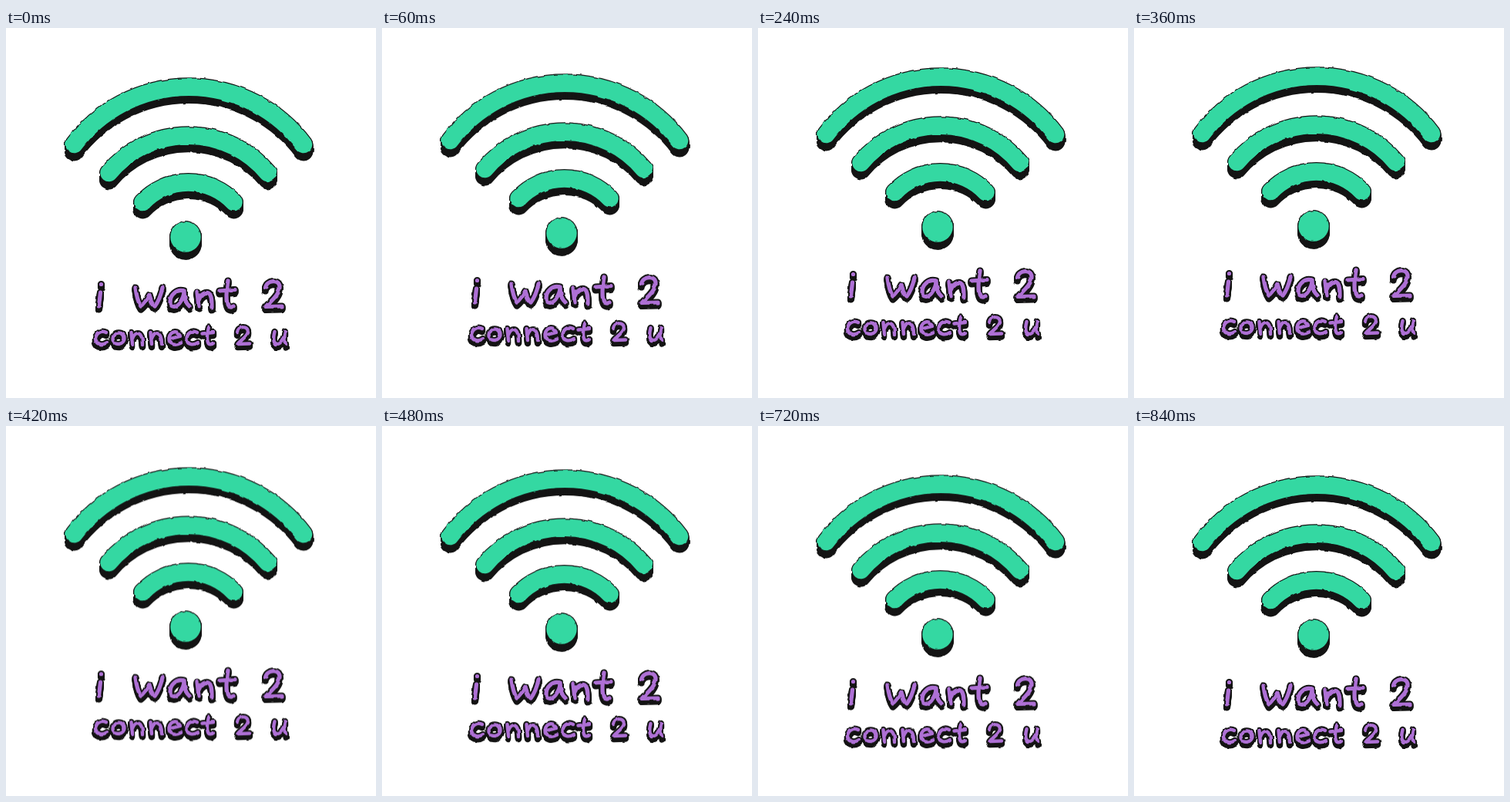
An HTML page that plays this animation: 480 by 480 pixels, repeating every 990 ms.

```html
<!DOCTYPE html>
<html lang="en">
<head>
<meta charset="utf-8">
<title>i want 2 connect 2 u</title>
<style>
  html, body { margin: 0; width: 100%; height: 100%; overflow: hidden; background: #fff; }
  svg { display: block; width: 100%; height: 100%; }
  path { fill: none; stroke-linecap: round; stroke-linejoin: round; }
</style>
</head>
<body>
<svg viewBox="0 0 480 480" role="img" aria-label="i want 2 connect 2 u">
  <filter id="rough" filterUnits="userSpaceOnUse" x="0" y="0" width="480" height="480" color-interpolation-filters="sRGB">
    <feTurbulence type="fractalNoise" baseFrequency=".11" numOctaves="1" seed="4"/>
    <feDisplacementMap in="SourceGraphic" scale="3.2" xChannelSelector="R" yChannelSelector="G"/>
  </filter>
  <g id="float"><g id="art" filter="url(#rough)"></g></g>
</svg>
<script>
const GREEN = '#34d8a2', PURPLE = '#ae70d5', INK = '#141414';
const art = document.getElementById('art');
const float = document.getElementById('float');

function stroke(d, color, width, dy = 0) {
  const p = document.createElementNS('http://www.w3.org/2000/svg', 'path');
  p.setAttribute('d', d);
  p.setAttribute('stroke', color);
  p.setAttribute('stroke-width', width);
  p.setAttribute('transform', `translate(0 ${dy})`);
  art.append(p);
}

// Coloured stroke with an ink rim, extruded downwards
function block(d, color, width, rim, depth) {
  for (let dy = depth; dy >= 0; dy--) stroke(d, INK, width + 2 * rim, dy);
  stroke(d, color, width);
}

const arc = (x1, x2, y, r) => `M${x1} ${y}A${r} ${r} 0 0 1 ${x2} ${y}`;

block(arc(88.5, 386, 151, 186), GREEN, 22.5, 1.2, 9);
block(arc(133.5, 339.5, 188, 134), GREEN, 22.5, 1.2, 9);
block(arc(177.5, 295.5, 226, 81), GREEN, 22.5, 1.2, 9);
block('M233 271h.01', GREEN, 39.5, 1.2, 9);

const line1 = [
  'M123.5 332.5h.01M122.5 343L120.5 361',
  'M168 337C169 346 171 355 175 361C180 358 183 352 186 346C187 352 189 358 193 361C198 355 201 346 203 337',
  'M231 341C221 338 213 347 213 355C213 363 220 363 225 357C229 352 231 347 231 341C231 350 233 357 238 361',
  'M248 343L250 361M250 353C253 345 259 342 263 344C267 347 267 354 267 362',
  'M288 328C286 340 285 351 287 358C288 362 292 363 295 361M277 341L297 339.5',
  'M336.5 337C338 327 355 325 355 336C355 346 343 355 337 361.5L358 361'
];
const line2 = [
  'M130 395C123 391 116 397 116 404C117 411 125 412 131 408',
  'M146 395.5C136 396 136 410 146 410C156 409 156 395 146 395.5',
  'M162.5 395L164 410M164 403C168 393 177 393 177 410',
  'M187.5 395L189 410M189 403C193 393 202 393 202 410',
  'M212 403.5L226 400C225 392 213 392 211.5 402C211 412 221 412 227 408.5',
  'M248 395C241 391 234 397 234.5 404C235 411 243 412 249 408',
  'M263 387.5C261 396 260 403 262 408C263 411 267 411 269 409M254.5 396.5L269 395',
  'M300 395C301 386 314 386 314 394C313 401 304 405 300.5 410L316 409.5',
  'M348.5 394C346 404 347 410 352 410C357 410 361 402 362 394C361 400 361 406 363 410.5'
];
line1.forEach(d => block(d, PURPLE, 5.2, 2, 4));
line2.forEach(d => block(d, PURPLE, 4.4, 2, 4));

const LOOP = 990, STEP = 30, PEAK = 360, END = 840, HEIGHT = 14;

function lift(t) {
  if (t < PEAK) return HEIGHT * (1 - (1 - t / PEAK) ** 2.4);
  if (t < END) return HEIGHT * ((END - t) / (END - PEAK)) ** 2;
  return 0;
}

function draw(now) {
  const t = Math.floor((now % LOOP) / STEP) * STEP;
  float.setAttribute('transform', `translate(0 ${-lift(t).toFixed(2)})`);
  requestAnimationFrame(draw);
}
draw(0);
</script>
</body>
</html>
```
